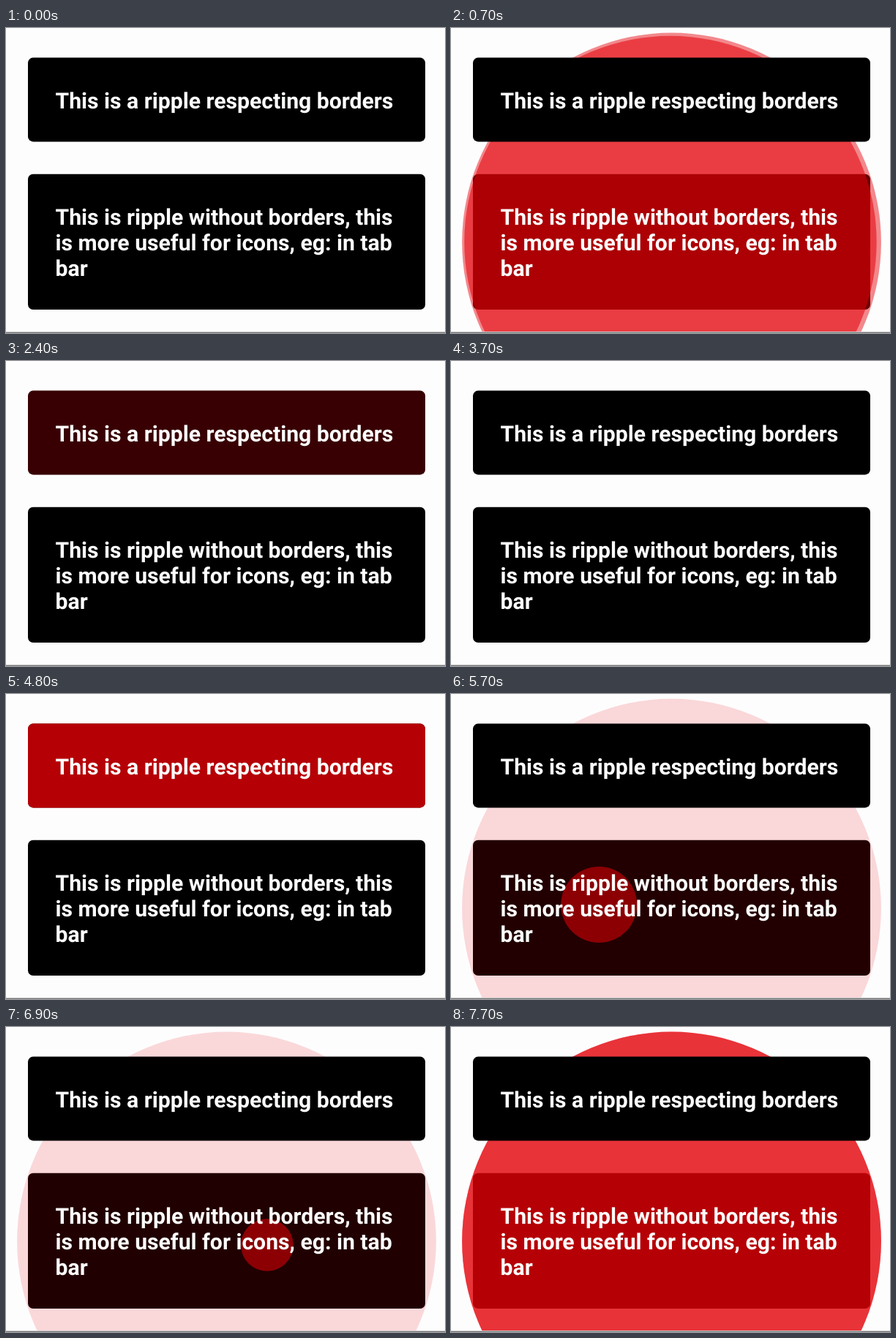
Write an HTML page that moves like this. It is 600x417 px and loops after 8 s.

```html
<!DOCTYPE html>
<html lang="en">
<head>
<meta charset="utf-8">
<title>Ripple buttons</title>
<style>
  html, body { margin: 0; width: 100%; height: 100%; overflow: hidden; background: #fefdfe; }
  svg { display: block; width: 600px; height: 417px; }
  text { font: 700 30.15px Roboto, sans-serif; fill: #fdfefd; text-rendering: geometricPrecision; }
  circle { fill: #e40008; }
</style>
</head>
<body>
<svg viewBox="0 0 600 417">
  <defs>
    <clipPath id="edge"><rect x="30" y="40.6" width="543" height="114.8" rx="7"/></clipPath>
  </defs>
  <rect width="600" height="417" fill="#fefdfe"/>

  <rect x="30" y="199.8" width="543" height="185.2" rx="7"/>
  <g id="free"><circle class="fill"/><circle class="wave"/></g>
  <text x="67.5" y="269">This is ripple without borders, this</text>
  <text x="67.5" y="304.2">is more useful for icons, eg: in tab</text>
  <text x="67.5" y="339.4">bar</text>

  <rect x="30" y="40.6" width="543" height="114.8" rx="7"/>
  <g id="bound" clip-path="url(#edge)"><circle class="fill"/><circle class="wave"/></g>
  <text x="67.5" y="110">This is a ripple respecting borders</text>

  <rect y="415" width="600" height="1" fill="#c8c8c8"/>
  <rect y="416" width="600" height="1" fill="#777"/>
</svg>
<script>
const LOOP = 8000;
const ALPHA = 0.55;
const FADE_IN = 500, FADE_OUT = 400;
const WAVE_DELAY = 122, WAVE_TIME = 450;

const buttons = {
  free: { cx: 301.5, cy: 293, r: 286.4 },
  bound: { cx: 301.5, cy: 98, r: 277.5 }
};

// button, touch x, touch y, press time, release time
const presses = [
  ['free', 205, 270, 280, 1050],
  ['bound', 205, 100, 1450, 2096],
  ['bound', 365, 98, 2560, 3220],
  ['bound', 215, 100, 3770, 4860],
  ['free', 180.2, 287, 5564, 6330],
  ['free', 364.7, 298.7, 6769, Infinity]
];

const clamp = v => Math.min(1, Math.max(0, v));
const mix = (a, b, k) => a + (b - a) * k;
const logEase = t => (1 - 400 ** -t) / (1 - 1 / 400);

function setCircle(el, cx, cy, r, opacity) {
  el.setAttribute('cx', cx);
  el.setAttribute('cy', cy);
  el.setAttribute('r', r);
  el.setAttribute('opacity', opacity);
}

for (const [id, b] of Object.entries(buttons)) {
  const group = document.getElementById(id);
  b.fill = group.querySelector('.fill');
  b.wave = group.querySelector('.wave');
}

function draw(time) {
  for (const [id, b] of Object.entries(buttons)) {
    const press = presses.find(p => p[0] === id && time >= p[3] && time < p[4] + FADE_OUT);
    if (!press) {
      setCircle(b.fill, b.cx, b.cy, b.r, 0);
      setCircle(b.wave, b.cx, b.cy, 0, 0);
      continue;
    }
    const [, x, y, down, up] = press;
    const age = time - down;
    const left = ALPHA * (1 - clamp((time - up) / FADE_OUT));
    const grow = logEase(clamp((age - WAVE_DELAY) / WAVE_TIME));
    setCircle(b.fill, b.cx, b.cy, b.r, left * clamp(age / FADE_IN));
    setCircle(b.wave, mix(x, b.cx, grow), mix(y, b.cy, grow), b.r * grow, left);
  }
}

const start = performance.now();
function tick() {
  draw((performance.now() - start) % LOOP);
  requestAnimationFrame(tick);
}
tick();
</script>
</body>
</html>
```
